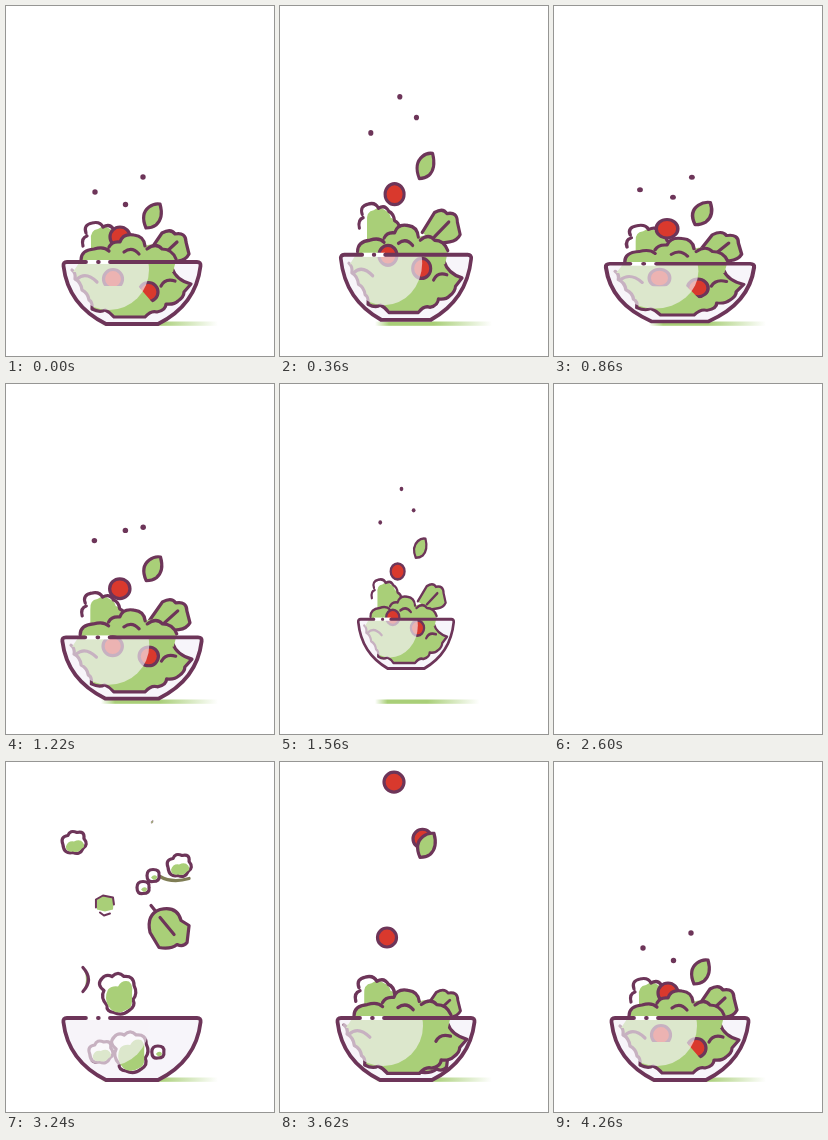
An HTML page that plays this animation: 268x350 px, repeating every 4.42 s.

```html
<!DOCTYPE html>
<html lang="en">
<head>
<meta charset="utf-8">
<title>Salad bowl</title>
<style>
  html, body { margin: 0; width: 100%; height: 100%; overflow: hidden; background: #fff; }
  svg { display: block; width: 268px; height: 350px; }
  .line { fill: none; stroke: #6d3559; stroke-width: 3.2; stroke-linecap: round; stroke-linejoin: round; }
  .green { fill: #a9cf78; }
  .red { fill: #d9392d; }
  .white { fill: #fff; }
  .dot { fill: #6d3559; }
</style>
</head>
<body>
<svg viewBox="0 0 268 350">
  <defs>
    <linearGradient id="fade">
      <stop offset="0" stop-color="#a9cf78" stop-opacity="0"/>
      <stop offset=".12" stop-color="#a9cf78"/>
      <stop offset=".5" stop-color="#a9cf78"/>
      <stop offset="1" stop-color="#a9cf78" stop-opacity="0"/>
    </linearGradient>
    <path id="shell" d="M61 256H191Q195 256 194.500 260C191 290 172 308 152 318H100C80 308 61 290 57.500 260Q57 256 61 256Z"/>
    <clipPath id="inside"><use href="#shell"/></clipPath>
    <clipPath id="above"><path d="M0-400H268V303H152L132 280H0Z"/></clipPath>

    <g id="lump">
      <path class="line white" d="M-11 2Q-14-6-6-7Q-4-13 3-10Q11-12 10-4Q15 2 9 6Q6 13-1 10Q-10 12-11 2Z"/>
      <path class="green" d="M-8 4Q-6-2 0-1Q6-4 9 0Q12 4 8 6Q4 11-1 9Q-8 10-8 4Z"/>
    </g>
    <g id="ring">
      <path class="line white" d="M-6 0Q-6-6 0-6Q7-6 6 0Q7 6 0 6Q-6 7-6 0Z"/>
      <path class="green" d="M-2 2Q1-2 4 1Q4 5 0 4Z"/>
    </g>
    <g id="head">
      <path class="line white" d="M-11 12Q-18 4-14-3Q-22-9-16-15Q-12-20-6-17Q0-23 6-17Q16-18 16-8Q20 0 15 6Q18 13 11 17Q4 23-4 19Q-12 18-11 12Z"/>
      <path class="green" d="M-10 12Q-14 4-10-4Q-6-8 0-7Q4-14 11-12Q15-8 14-2L14 7Q14 15 9 16Q0 22-7 16Z"/>
    </g>
    <g id="chip">
      <path class="green" d="M-8-5L-2-9L9-7L8 5L0 7L-8 5Z"/>
      <path class="line" style="stroke-width:2" d="M-9 3V-5L-2-9L8-7L9 0M5 9L-1 11L-5 8"/>
    </g>
    <g id="frond">
      <path class="line green" d="M-9 20L-18 5Q-22-13-8-18Q9-22 13-7L21-2L19 15Q15 20 9 17Q3 22-9 20Z"/>
      <path class="line" d="M-17-22L-13-17M-8-10L6 7"/>
    </g>
    <g id="curl">
      <path class="green" d="M-2-10Q6 0-2 11Q2 0-2-10Z"/>
      <path class="line" d="M-3-12Q8 0-3 12"/>
    </g>
    <g id="chain">
      <path class="line" style="stroke:#7f7d55" d="M-6 1Q6 8 23 3"/>
      <use href="#lump" x="13" y="-10"/>
      <use href="#ring" x="-13"/>
      <use href="#ring" x="-23" y="12"/>
    </g>
  </defs>

  <rect id="shadow" x="95" y="315.500" width="117" height="4.300" fill="url(#fade)"/>

  <g id="bowl">
    <use href="#shell" fill="#f7f5fa"/>
    <g id="bits"></g>

    <g id="left">
      <path class="green" d="M85 252V234Q84 224 92 223Q98 218 104 223Q109 225 110 230Q118 232 120 242V252Z"/>
      <path class="line" d="M77 240Q75 232 81 230M80 227Q77 219 86 217Q94 215 97 221Q104 217 108 224Q113 226 114 233Q119 235 119 240"/>
    </g>
    <circle id="topTomato" class="line red" cx="114" cy="231" r="10"/>
    <g id="right">
      <path class="line green" d="M143 246L156 227Q165 222 169 228Q180 226 180 236L183 248Q180 254 172 255L158 257"/>
      <path class="line" d="M156 250L171 236"/>
    </g>
    <g id="inner">
      <path class="line green" d="M66 264Q70 267 69 273Q75 276 76 284Q82 287 83 294Q87 296 86 303Q94 307 99 304Q104 306 108 311H139Q145 304 151 306Q160 304 160 298Q168 299 172 295Q178 291 178 286L185 278Q170 274 166 262"/>
      <path class="line" d="M71 273Q80 265 91 276M155 280Q159 272 169 275"/>
    </g>
    <g id="mid">
      <path class="green" d="M75 254Q75 244 88 243Q98 240 103 246Q104 236 114 236Q117 227 128 229Q138 230 139 240Q150 236 156 243Q166 243 170 254L167 266H67Z"/>
      <path class="line" d="M75 254Q75 244 88 243Q98 240 103 245M103 241Q106 235 114 236Q117 227 128 229Q138 230 139 240M118 246Q126 240 133 248M141 243Q150 236 156 243Q166 243 170 253"/>
    </g>
    <g clip-path="url(#above)"><circle id="tomatoA" class="line red" cx="107" cy="273" r="9.500"/></g>
    <g clip-path="url(#above)"><circle id="tomatoB" class="line red" cx="142.500" cy="286" r="9.500"/></g>

    <path id="leaf" class="line green" d="M154 198Q158 212 150 219Q146 222 140 222Q134 208 143 201Q148 197 154 198Z"/>
    <circle id="dotA" class="dot" cx="89" cy="186" r="2.700"/>
    <circle id="dotB" class="dot" cx="137" cy="171" r="2.700"/>
    <circle id="dotC" class="dot" cx="119.500" cy="198.500" r="2.700"/>

    <circle cx="103" cy="264" r="40" fill="#f8f5f9" opacity=".65" clip-path="url(#inside)"/>
    <path d="M80 256H104" stroke="#fff" stroke-width="4"/>
    <path class="line" style="stroke-width:3.800" d="M80 256H61Q57 256 57.500 260C61 290 80 308 100 318H152C172 308 191 290 194.500 260Q195 256 191 256H104M92 256h.8"/>
  </g>
</svg>
<script>
const LOOP = 4420, WINDUP = 80, HOP = 400, LEAP = 1280, BACK = 2620, POUR = 3240;
const $ = id => document.getElementById(id);
const clamp = x => Math.max(0, Math.min(1, x));
const smooth = p => p * p * (3 - 2 * p);
const part = (t, from, to) => clamp((t - from) / (to - from));
const pop = p => 1 + 2.2 * (p - 1) ** 3 + 1.2 * (p - 1) ** 2;

// Squash and stretch follow the toss height; the last leap shrinks away.
function pose(t) {
  if (t >= BACK) {
    const q = t - BACK;
    const size = 1 - Math.exp(-.0085 * q) * Math.cos(Math.PI * q / 240);
    return { sx: size, sy: Math.min(size, 1), cy: 288, toss: 0 };
  }
  const wind = smooth(part(t, 0, WINDUP));
  const leap = Math.sin(Math.PI * part(t, LEAP, LEAP + 560));
  const hop = Math.max(0, t - WINDUP) % HOP / HOP;
  const toss = t < LEAP ? 1.04 * Math.sin(Math.PI * hop ** 1.27) : 1.05 * leap;
  const size = 1 - part(t, 1400, 1720) ** 2;
  return {
    sx: (1 + .115 * wind - .174 * toss) * size,
    sy: (1 - .1 * wind + .158 * toss) * size,
    cy: 288 + wind - 7 * toss - 21 * leap,
    toss
  };
}

// shape and where it is at the height of the pour
const bits = [
  ['lump', 74, 380], ['head', 123, 350], ['ring', 169, 320],
  ['head', 112, 231], ['curl', 80, 217], ['frond', 162, 165],
  ['chip', 99, 142], ['chain', 160, 113], ['lump', 68, 80]
].map(([shape, x, y]) => {
  const el = document.createElementNS('http://www.w3.org/2000/svg', 'use');
  el.setAttribute('href', '#' + shape);
  $('bits').append(el);
  return { el, x, y };
});

// toss height and lag; a lag under 1 leads the others
const flyers = [
  ['tomatoA', 18, 1.4], ['tomatoB', 18, .9], ['topTomato', 34, .6],
  ['dotA', 49, 1], ['dotB', 49, 1.1], ['dotC', 100, 1.2]
].map(([id, height, lag]) => ({ el: $(id), height, lag, rest: +$(id).getAttribute('cy') }));

// foot of each clump, from which it grows, and toss height
const clumps = [['inner', 126, 300, 0], ['left', 100, 254, 10], ['mid', 124, 266, 1], ['right', 160, 256, 12]];

function place(el, transform, shown) {
  el.setAttribute('transform', transform);
  el.style.display = shown ? '' : 'none';
}

const scaled = (x, y, sx, sy, dy = 0) =>
  `translate(${x} ${y + dy}) scale(${sx} ${sy}) translate(${-x} ${-y})`;

function draw(t) {
  const { sx, sy, cy, toss } = pose(t);
  const filling = t >= BACK;
  place($('bowl'), `translate(126 ${cy}) scale(${sx} ${sy}) translate(-126 -288)`, sx > .01);

  const shade = filling ? part(t, BACK, BACK + 90)
    : 1 - .1 * part(t, 1480, 1560) - .9 * part(t, 1560, 1680);
  place($('shadow'), scaled(95, 0, shade, 1), shade > .01);

  for (const b of bits) {
    const y = Math.min(290, b.y + .5 * (t - POUR));
    const x = 126 + (b.x - 126) * (1 - .4 * part(y, 231, 290));
    const s = smooth(part(y, 15, 70));
    place(b.el, `translate(${x} ${y}) scale(${s})`, filling && s > .02 && t < 3660);
  }

  clumps.forEach(([id, x, y, height], i) => {
    const start = 3330 + 55 * i;
    const s = filling ? pop(part(t, start, start + 370)) : 1;
    place($(id), scaled(x, y, s, s, -height * toss), s > .01);
  });

  flyers.forEach((f, i) => {
    const start = 3380 + 110 * i;
    const up = filling ? (f.rest - 18) * (1 - part(t, start, start + 320) ** 1.7) : f.height * toss ** f.lag;
    place(f.el, `translate(0 ${-up})`, !filling || t >= start);
  });

  const leafSize = filling ? smooth(part(t, 3180, 3480)) : 1;
  const leafUp = filling ? 150 * (1 - part(t, 3450, 3960) ** 1.7) : 41 * toss;
  place($('leaf'), scaled(146, 210, leafSize, leafSize, -leafUp), leafSize > .01);
}

const begin = performance.now();
function tick() {
  draw((performance.now() - begin) % LOOP);
  requestAnimationFrame(tick);
}
tick();
</script>
</body>
</html>
```
